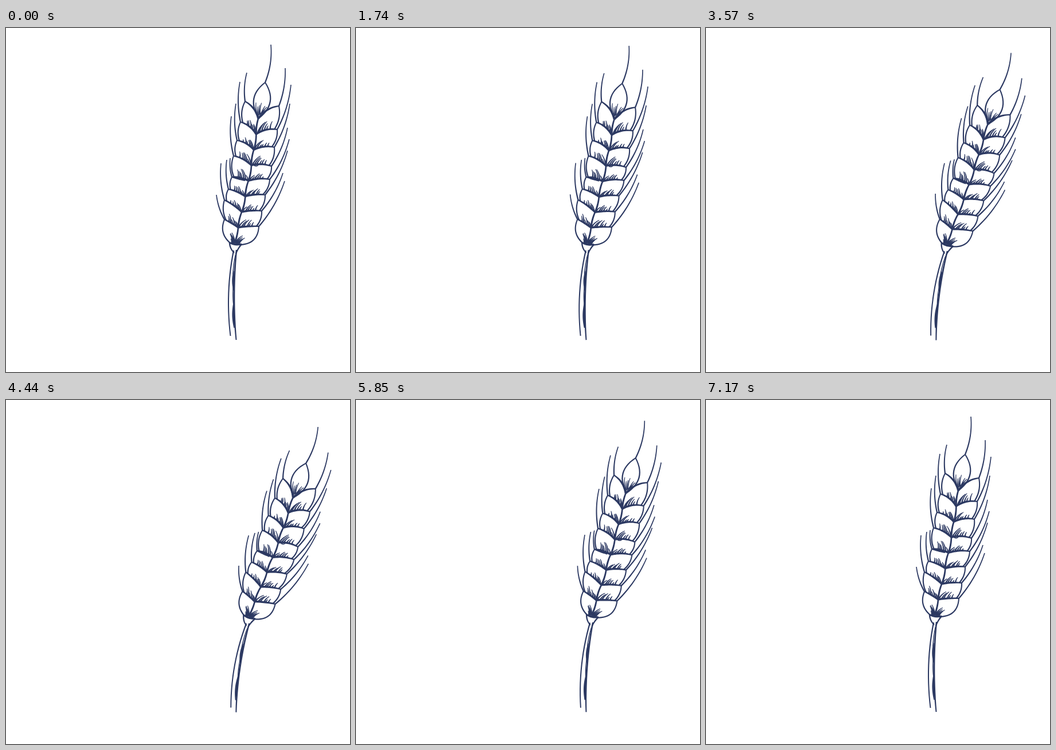
An HTML page with a canvas that plays this animation: 600x600 px, repeating every 7.23 s.

```html
<!DOCTYPE html>
<html lang="en">
<head>
<meta charset="utf-8">
<title>Swaying wheat</title>
<style>
  html, body { margin: 0; width: 100%; height: 100%; overflow: hidden; background: #fff; }
  canvas { display: block; }
</style>
</head>
<body>
<canvas id="stage" width="600" height="600"></canvas>
<script>
const ctx = document.getElementById('stage').getContext('2d');
const INK = '#2c3962';
const LOOP = 7230, STEP = 30;
const RISE = 740, PEAK = 4510, REST = 7180;
const MAX_BEND = 0.171;
const ROOT = { x: 396, y: 543 }, STEM = 165;
const LEFT = -1, RIGHT = 1, ROWS = 8;

// Husk tip x, y and the free end x, y of its awn, from the top down.
const leftTips = [
  [417, 128, 420, 78], [409, 164, 408, 94], [403, 196, 401, 132], [397, 223, 393, 154],
  [394, 260, 391, 227], [388, 281, 385, 230], [381, 300, 375, 236], [381, 334, 367, 291]
];
const rightTips = [
  [476, 136, 487, 70], [473, 177, 497, 99], [468, 208, 495, 132], [463, 241, 491, 174],
  [460, 264, 494, 194], [452, 291, 491, 214], [446, 319, 483, 253], [441, 346, 486, 267]
];

let seed = 11;
const rand = () => (seed = (seed * 16807) % 2147483647) / 2147483647;
const between = (a, b) => a + (b - a) * rand();
const lerp = (a, b, u) => [a[0] + (b[0] - a[0]) * u, a[1] + (b[1] - a[1]) * u];
const joint = k => [440 - 5 * k + 3 * Math.sin(Math.PI * k / 7), 158 + 27.1 * k];
const shapes = [];

// Point on an arc from a to b; bow is the sideways pull relative to its length.
function arc(a, b, bow, u) {
  const dx = b[0] - a[0], dy = b[1] - a[1], pull = 2 * bow * u * (1 - u);
  return [a[0] + dx * u + dy * pull, a[1] + dy * u - dx * pull];
}

// Adds an arc as an outline of varying width.
function brush(a, b, bow, from, to, swell = 0) {
  const n = 14, one = [], two = [];
  for (let i = 0; i <= n; i++) {
    const u = i / n, [x, y] = arc(a, b, bow, u);
    const p = arc(a, b, bow, u - 0.01), q = arc(a, b, bow, u + 0.01);
    const dx = q[0] - p[0], dy = q[1] - p[1];
    const w = (from + (to - from) * u + swell * Math.sin(Math.PI * u)) / 2 / Math.hypot(dx, dy);
    one.push([x - dy * w, y + dx * w]);
    two.unshift([x + dy * w, y - dx * w]);
  }
  shapes.push(one.concat(two));
}

function spikelets(tips, side, collar, belly) {
  const fold = (k, u) => k < ROWS
    ? arc(joint(k), tips[k], side * (0.22 - 0.025 * k), u)
    : arc(joint(ROWS), collar, 0, u);

  tips.forEach(([x, y, ax, ay], k) => {
    const tip = [x, y], last = k === ROWS - 1;
    brush([ax, ay], tip, side * 0.1, 1.6, 2.3);
    brush(joint(k), tip, side * (0.22 - 0.025 * k), 3.6, 2.1, 0.3);
    brush(tip, last ? collar : fold(k + 1, 0.88), side * (last ? belly : 0.2), 2, 2.3);

    // Shading grows from the lower fold toward the husk tip.
    const count = 6;
    for (let i = 0; i < count; i++) {
      const u = (i + between(0.1, 0.6)) / count * 0.75;
      const base = fold(k + 1, u);
      const aim = lerp(tip, joint(k), 0.35 - 0.3 * u);
      brush(base, lerp(base, aim, between(0.2, 0.55) * (1 - 0.4 * u)), side * 0.15, 2.6, 1);
    }
  });
}

function topHusk() {
  const tip = [452, 95], base = [441, 157];
  brush([462, 29], tip, 0.12, 1.6, 2.3);
  brush(tip, base, -0.46, 2, 2.5);
  brush(tip, base, 0.46, 2, 2.5);
  for (let i = 0; i < 7; i++) {
    const x = 436 + 3.2 * i;
    brush([lerp(base, [x, 0], 0.45)[0], 154 - i], [x, between(130, 145)], 0.1, 2.2, 1);
  }
}

function stem() {
  brush([397, 388], [391.5, 537], -0.08, 2.2, 1.9);
  brush([402, 387], [401.5, 544], -0.05, 2.4, 2, 0.8);
  brush([400, 396], [396, 430], -0.05, 1, 1.6);
  brush([397, 424], [397, 458], -0.05, 1.2, 1.2, 2.6);
  brush([396, 452], [397, 484], -0.05, 1, 1.5);
  brush([397, 480], [398, 523], -0.05, 1.4, 1.4, 2.6);

  // Collar
  brush([389, 374], [411, 377], -0.15, 2.4, 2.6, 1.5);
  brush([390, 375], [398, 392], -0.2, 2.4, 2);
  brush([411, 377], [401, 394], -0.1, 2.6, 2);
}

topHusk();
spikelets(leftTips, LEFT, [391, 375], 0.36);
spikelets(rightTips, RIGHT, [409, 378], 0.45);
for (let k = 0; k < ROWS; k++)
  brush(joint(k), joint(k + 1), k % 2 ? 0.08 : -0.08, 2.6, 3.2);
brush([395, 260], [417, 266], 0.1, 2.4, 2.4, 3);
brush([433, 240], [441, 237], -0.5, 1.6, 1.4);
stem();

// The stem curves up to the collar, and the ear follows its tilt.
function warp([x, y], bend) {
  const s = ROOT.y - y, low = Math.min(s, STEM), r = low / STEM;
  const mean = bend * (0.7 + 0.15 * r), tilt = bend * (0.7 + 0.3 * r);
  const sin = Math.sin(tilt), cos = Math.cos(tilt), off = x - ROOT.x;
  return [
    ROOT.x + low * Math.sin(mean) + (s - low) * sin + off * cos,
    ROOT.y - low * Math.cos(mean) - (s - low) * cos + off * sin
  ];
}

function bendAt(t) {
  if (t < 810 || t >= 7170) return 0;
  const u = t < PEAK ? (t - RISE) / (PEAK - RISE) : (REST - t) / (REST - PEAK);
  return MAX_BEND * (0.94 * (1 - Math.cos(Math.PI * u)) / 2 + 0.06 * u);
}

function draw(t) {
  const bend = bendAt(Math.floor(t / STEP) * STEP);
  ctx.fillStyle = '#fff';
  ctx.fillRect(0, 0, 600, 600);
  ctx.fillStyle = INK;
  for (const shape of shapes) {
    ctx.beginPath();
    for (const point of shape) ctx.lineTo(...warp(point, bend));
    ctx.fill();
  }
}

const start = performance.now();
function tick() {
  draw((performance.now() - start) % LOOP);
  requestAnimationFrame(tick);
}
tick();
</script>
</body>
</html>
```
